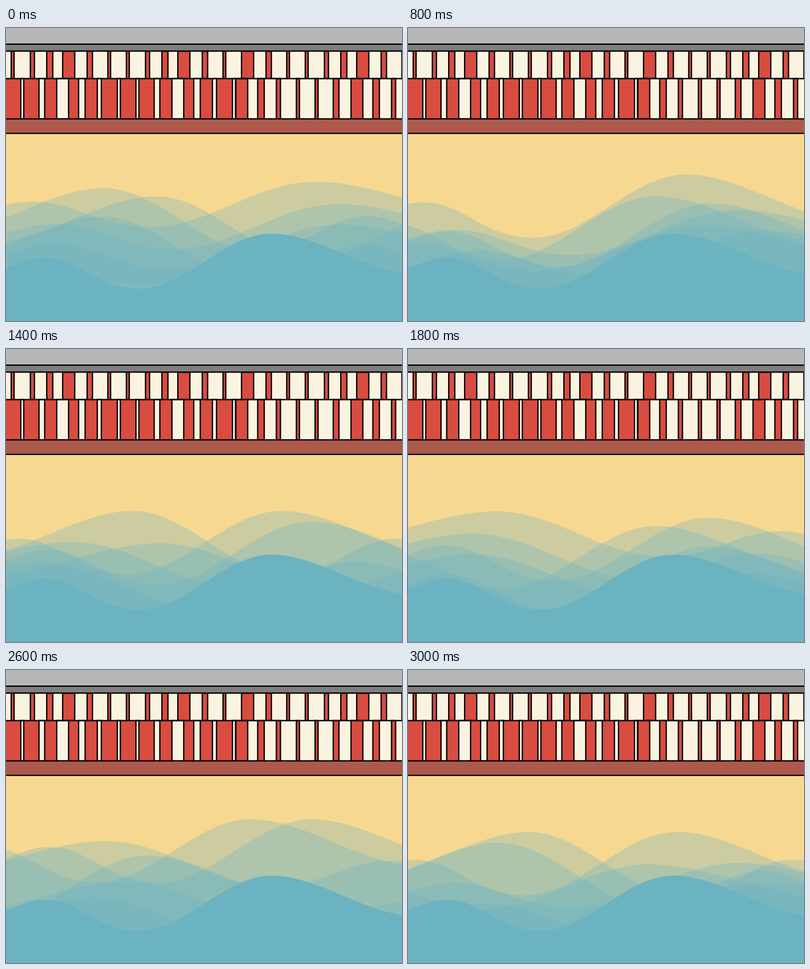
These frames come from a looping animation (870 by 644 pixels, 3200 ms). An HTML page:

```html
<!DOCTYPE html>
<html lang="en">
<head>
<meta charset="utf-8">
<title>Waves below a striped wall</title>
<style>
  html, body { margin: 0; width: 100%; height: 100%; overflow: hidden; background: #f7d891; }
  svg { display: block; width: 100vw; height: 100vh; }
  .sea { fill: #6bb3c0; }
  .beat { fill: #6bb3c0; fill-opacity: .31; visibility: hidden; animation: beat 3.2s step-end infinite; }
  .ink { fill: none; stroke: #060404; stroke-width: 2.9; }
  .plank { stroke: #060404; stroke-width: 2.9; }
  @keyframes beat {
    0% { visibility: visible; }
    6.25%, 100% { visibility: hidden; }
  }
</style>
</head>
<body>
<svg viewBox="0 0 870 644" preserveAspectRatio="none">
  <defs>
    <path id="wave" d="M0 528C30 518 52 505 85 505C160 505 200 573 292 573
      C397 573 478 452 583 452C678 452 768 522 870 539V724H0Z"/>
  </defs>
  <rect width="870" height="644" fill="#f7d891"/>
  <rect width="870" height="36" fill="#b7b7b7"/>
  <g id="wall"></g>
  <rect y="36" width="870" height="15" fill="#7f7f7f"/>
  <rect y="200" width="870" height="32" fill="#ad5a4d"/>
  <path class="ink" d="M0 35.5H870M0 50.7H870M0 111.2H870M0 199.8H870M0 231.6H870"/>
  <g id="veils"></g>
  <use href="#wave" class="sea"/>
</svg>
<script>
const $ = id => document.getElementById(id);
const make = (tag, attrs, parent) => {
  const el = document.createElementNS("http://www.w3.org/2000/svg", tag);
  for (const k in attrs) el.setAttribute(k, attrs[k]);
  return parent.appendChild(el);
};

// The wall repeats one motif of six planks per row: [offset, width]
const red = "#d94c40", cream = "#f9f3e0", span = 253;
const upper = [[0, 26.5], [53.7, 11.8], [99.3, 6], [140, 6.3], [182, 9], [218, 13.3]];
const lower = [[0, 26], [48, 14.3], [89, 9], [133, 6.7], [174, 6.5], [214, 12.5]];

// Paints from x to the right edge; a later run covers the rest of an earlier one
function run(x, end, motif, y, height, plank, ground) {
  make("rect", { x, y, width: 870 - x, height, fill: ground }, $("wall"));
  for (; x < end; x += span) {
    for (const [dx, width] of motif) {
      make("rect", { class: "plank", x: x + dx, y, width, height, fill: plank }, $("wall"));
    }
  }
}
run(-128.5, 517, upper, 51, 60, red, cream);
run(517.5, 870, upper, 51, 60, red, cream);
run(-141.5, 504, lower, 111, 89, cream, red);
run(505, 870, lower, 111, 89, red, cream);

// Each pose holds six crests [x, y]; a negative x mirrors the swell
const scales = { steep: [1.16, 1.15], wide: [1.25, 0.82], big: [1.25, 1.15] };
const rise = {
  steep: [[-215, 352], [-330, 370], [-213, 415]],
  wide: [[680, 338], [731, 387], [731, 432]]
};
const roll = {
  steep: [[545, 348], [660, 365], [545, 397]],
  wide: [[-215, 397], [-275, 432]],
  big: [[-199, 341]]
};
const peak = {
  steep: [[-258, 322], [-325, 370], [-205, 386]],
  wide: [[-145, 400], [-222, 434], [-89, 445]]
};
const twin = {
  steep: [[537, 328], [672, 328], [310, 408]],
  wide: [[-220, 376], [-265, 465], [-185, 500]]
};
const fall = {
  steep: [[-265, 356], [592, 356], [-200, 380]],
  wide: [[530, 427], [725, 424], [797, 470]]
};

const plain = (pose, dy = 0) => [pose, `translate(0 ${dy})`];
const flip = (pose, dx = 0, dy = 0) => [pose, `translate(${870 + dx} ${dy}) scale(-1 1)`];

const beats = [
  plain(rise), flip(fall, 0, -34), plain(roll), flip(twin, 0, -3),
  flip(peak), flip(rise), plain(peak), flip(fall),
  flip(roll, 0, -4), flip(rise, 5, 19), plain(fall, -3), flip(peak, -22, -12.5),
  flip(roll, 0, -19), plain(twin), flip(rise, 0, 6), plain(fall)
];

beats.forEach(([pose, transform], i) => {
  const beat = make("g", { class: "beat", transform,
    style: `animation-delay:${i * 200 - 3200}ms` }, $("veils"));
  for (const kind in pose) {
    const [sx, sy] = scales[kind];
    for (const [x, y] of pose[kind]) {
      make("use", { href: "#wave", transform: `translate(${Math.abs(x)} ${y}) ` +
        `scale(${sx * Math.sign(x)} ${sy}) translate(-583 -452)` }, beat);
    }
  }
});
</script>
</body>
</html>
```
